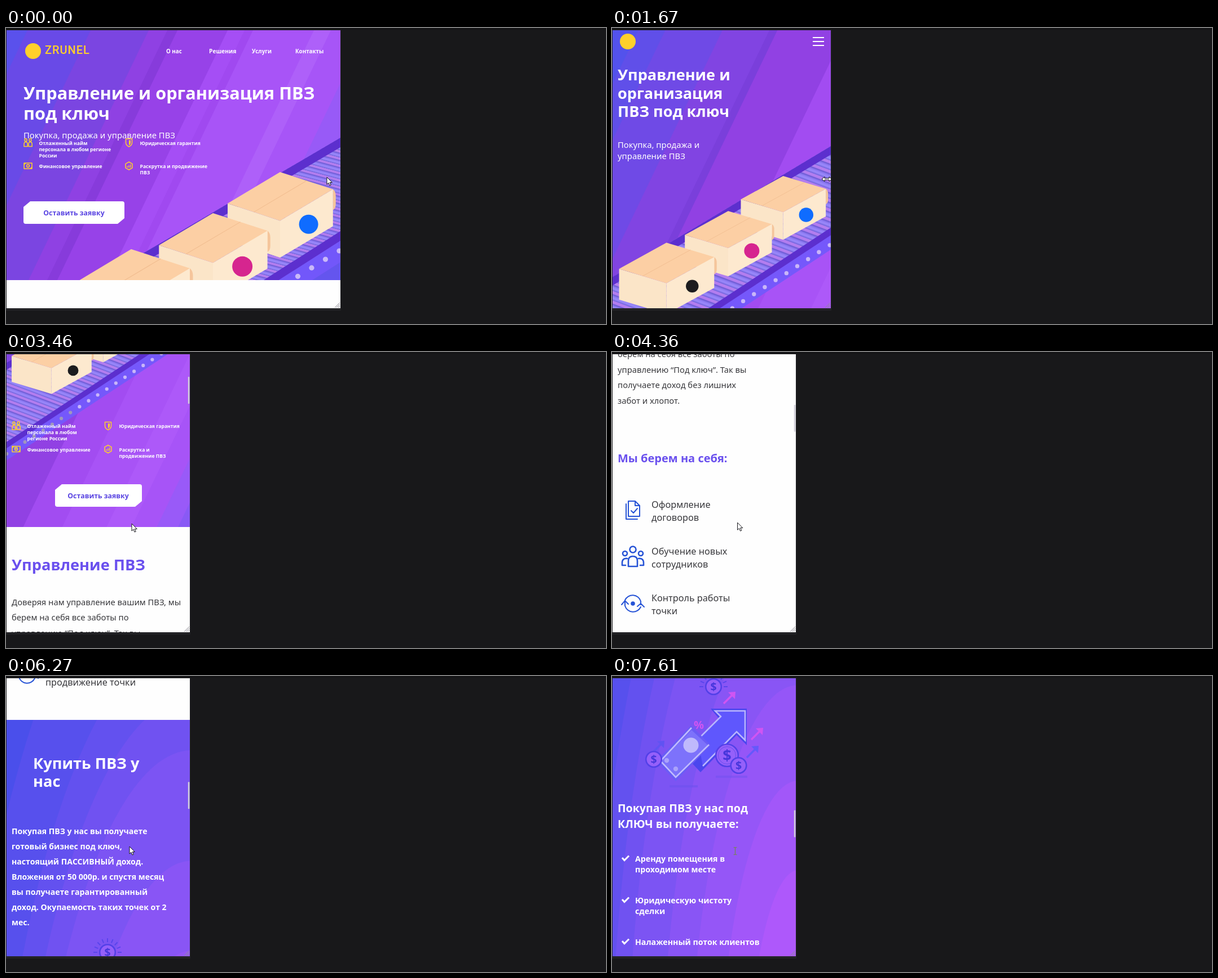
An HTML page for the animation above (8000 ms loop, 1064 by 526 pixels).

```html
<!DOCTYPE html>
<html lang="ru">
<head>
<meta charset="utf-8">
<title>Адаптивная страница</title>
<style>
html, body { margin: 0; width: 100%; height: 100%; overflow: hidden; background: #18181a; }
svg { display: block; width: 1064px; height: 526px; }
text { font-family: "Noto Sans", "Open Sans", sans-serif; white-space: pre; }
</style>
</head>
<body>
<svg id="stage" viewBox="0 0 1064 526" xmlns="http://www.w3.org/2000/svg"></svg>
<script>
const $ = id => document.getElementById(id);
const WHITE = '#fff', YELLOW = '#ffd02b', BLUE = '#2653d6', INK = '#37373b';

// ---------- drawing helpers ----------
const text = (x, y, s, size, fill, weight = 400, extra = '') =>
  `<text x="${x}" y="${y}" font-size="${size}" fill="${fill}" font-weight="${weight}" ${extra}>${s}</text>`;
const lines = (x, y, step, rows, size, fill, weight) =>
  rows.map((s, i) => text(x, y + i * step, s, size, fill, weight)).join('');
const rect = (x, y, w, h, fill, extra = '') =>
  `<rect x="${x}" y="${y}" width="${w}" height="${h}" fill="${fill}" ${extra}/>`;
const dot = (x, y, r, fill, extra = '') => `<circle cx="${x}" cy="${y}" r="${r}" fill="${fill}" ${extra}/>`;
const poly = (pts, fill, extra = '') => `<polygon points="${pts}" fill="${fill}" ${extra}/>`;
const path = (d, fill, extra = '') => `<path d="${d}" fill="${fill}" ${extra}/>`;
const line = (d, color, w, extra = '') => path(d, 'none', `stroke="${color}" stroke-width="${w}" ${extra}`);
const at = (x, y, body) => `<g transform="translate(${x} ${y})">${body}</g>`;

// Slanted bands, each running from its top intercept to the far right.
const bands = list => list.map(([x, fill]) =>
  poly(`${x + 168},-350 3000,-350 3000,950 ${x - 456},950`, fill)).join('');

// Strip between two sloping lines y = a + (x0 - x) * k.
function strip(x0, a, ka, b, kb, fill) {
  const y = (v, k, x) => v + (x0 - x) * k;
  return poly(`-60,${y(a, ka, -60)} 900,${y(a, ka, 900)} 900,${y(b, kb, 900)} -60,${y(b, kb, -60)}`, fill);
}

function box(x, y, sx, sy, mark, r) {
  return `<g transform="translate(${x} ${y}) scale(${sx} ${sy})">` +
    path('M113,34 q6,4 6,13 v16 q0,9 -6,12 z', '#f5c59b') +
    poly('-112,62 0,96 0,169 -112,135', '#fbe5c8') +
    poly('0,96 113,34 113,107 0,169', '#fde9cf') +
    poly('0,0 113,34 0,96 -112,62', '#fccfa4') +
    line('M-56,79 L57,17', '#f1bd90', 1.2) + '</g>' +
    dot(x + 61 * sx, y + 103 * sy, r, mark);
}

const marks = ['#0f6cff', '#d6258f', '#1c1c1e'];

function wideArt() {
  let s = rect(0, 0, 700, 460, '#5a51ec') + bands([
    [40, '#694ae7'], [152, '#7b45e1'], [255, '#8f41e3'], [288, '#873bdb'], [306, '#9742e8'],
    [395, '#a54ef5'], [425, '#a049f0'], [440, '#a854f7'], [548, '#ae60f9'], [578, '#a755f7'],
    [640, '#985af7'], [690, '#8358f6']]);
  s += strip(593, 195, .587, 362, .64, 'url(#slatsFine)');
  s += strip(593, 195, .587, 212, .587, '#5c2fce');
  s += strip(593, 378, .64, 416, .64, '#7257fa') + strip(593, 361, .64, 378, .64, '#5c2fce');
  s += strip(593, 416, .64, 620, .64, '#6455ee');
  for (let i = 0; i < 5; i++) s += dot(591 - i * 24.5, 396 + i * 15.1, 4.6, '#c9b8f8');
  return s + box(486, 256, .83, .9, marks[0], 17) + box(367, 329, .855, .92, marks[1], 18) +
    box(222, 393, .92, 1, marks[2], 15);
}

function narrowArt() {
  let s = rect(-100, -350, 1500, 1400, '#5352ec') + bands([
    [-25, '#604fe9'], [39, '#6f4ae6'], [174, '#8144e2'], [285, '#7a3fdb'], [304, '#9141e3'],
    [465, '#a24cf1'], [575, '#a853f6'], [700, '#ad59f9'], [770, '#a754f7'],
    [841, '#995af8'], [901, '#895af5']]);
  s += strip(489, 104, .601, 302, .66, 'url(#slats)');
  s += strip(489, 104, .601, 124, .601, '#5c2fce');
  s += strip(489, 316, .66, 351, .66, '#7558fb') + strip(489, 299, .66, 317, .66, '#5c2fce');
  for (let i = -3; i < 19; i++) {
    const x = 468 - i * 25.6;
    s += dot(x, 352 + i * 16.6, 4.9, x < 195 ? '#a096bd' : '#c9b6f8');
  }
  return s + box(409, 155, .893, .893, marks[0], 17) + box(279, 238, .915, .915, marks[1], 18) +
    box(133, 313, 1, 1, marks[2], 15);
}

// ---------- hero parts ----------
const stroke = (d, w = 1.5) => line(d, YELLOW, w, 'stroke-linejoin="round"');
const featIcons = {
  people: stroke('M-6,-4.5 a2,2.4 0 1 1 4,0 a2,2.4 0 1 1 -4,0 M2,-4.5 a2,2.4 0 1 1 4,0 a2,2.4 0 1 1 -4,0 ' +
    'M-7,7 v-4 q0,-4 3.2,-4 q3,0 3,4 v4 z M1,7 v-4 q0,-4 3.2,-4 q3,0 3,4 v4 z'),
  shield: stroke('M-5.5,-6.5 h11 v7 q0,4 -5.5,7 q-5.5,-3 -5.5,-7 z') + path('M0,-4 h3 v5 q0,2 -3,4 z', YELLOW),
  cash: stroke('M-7,-5 h14 v10 h-14 z') + stroke('M-2.4,0 a2.4,2.4 0 1 1 4.8,0 a2.4,2.4 0 1 1 -4.8,0') +
    path('M-7,-5 h4 l-4,4 z M7,5 h-4 l4,-4 z', YELLOW),
  chart: stroke('M0,-7 L6,-3.6 V3.6 L0,7 L-6,3.6 V-3.6 Z') + stroke('M-2.8,3 V0.5 M0,3 V-1 M2.8,3 V-2.5', 1.4)
};
const feature = (x, y, icon, rows) =>
  at(x, y, featIcons[icon] + lines(19.5, 4, 11, rows, 8.6, WHITE, 600));

function features(x1, x2, y, first, last) {
  return feature(x1, y, 'people', first) + feature(x2, y, 'shield', ['Юридическая гарантия']) +
    feature(x1, y + 41.5, 'cash', ['Финансовое управление']) + feature(x2, y + 41.5, 'chart', last);
}

const button = (x, y, w, dx) => at(x, y,
  path(`M12,0 H${w - 4} q4,0 4,4 V30 L${w - 12},40 H4 q-4,0 -4,-4 V10 Z`, WHITE) +
  text(dx, 25, 'Оставить заявку', 12.3, '#5a45e2', 700, 'text-anchor="middle"'));

const burger = id => `<g id="${id}">` + [0, 7, 14].map(y => rect(0, y, 20, 2, WHITE)).join('') + '</g>';

const heroWide = () =>
  dot(48, 41, 14, YELLOW) +
  `<text x="69" y="46" font-size="20" font-weight="500" fill="${YELLOW}" letter-spacing="1" style="font-family:Roboto,sans-serif">ZRUNEL</text>` +
  text(284, 45, 'О нас', 9.8, WHITE, 600) + text(360, 45, 'Решения', 10.2, WHITE, 700) +
  text(436, 45, 'Услуги', 9.8, WHITE, 600) + text(513, 45, 'Контакты', 9.8, WHITE, 600) +
  lines(31, 127, 36, ['Управление и организация ПВЗ', 'под ключ'], 30.7, WHITE, 700) +
  text(31, 196, 'Покупка, продажа и управление ПВЗ', 14.8, WHITE) +
  features(39, 218, 203.5, ['Отлаженный найм', 'персонала в любом регионе', 'России'], ['Раскрутка и продвижение', 'ПВЗ']) +
  button(31, 308, 179, 89.5);

const heroMid = () =>
  dot(92, 32, 19, YELLOW) + burger('burgerMid') +
  lines(66, 104, 32.5, ['Управление и', 'организация ПВЗ', 'под ключ'], 27.1, WHITE, 700) +
  lines(66, 223, 19.5, ['Покупка, продажа и управление', 'ПВЗ'], 14.8, WHITE);

const heroSmall = () =>
  dot(28, 24, 14, YELLOW) + burger('burgerSmall') +
  lines(10, 93, 32.5, ['Управление и', 'организация', 'ПВЗ под ключ'], 27.1, WHITE, 700) +
  lines(10, 213, 19.5, ['Покупка, продажа и', 'управление ПВЗ'], 14.8, WHITE) +
  features(18, 181, 507, ['Отлаженный найм', 'персонала в любом', 'регионе России'], ['Раскрутка и', 'продвижение ПВЗ']) +
  button(87, 611, 154, 76.5);

// ---------- page below the hero ----------
const bl = (d, w = 2) => line(d, BLUE, w, 'stroke-linecap="round" stroke-linejoin="round"');
const itemIcons = {
  pin: path('M0,19 L-8,8 H-13 V-8 H13 V8 H8 Z', BLUE) + dot(0, 0, 5, WHITE),
  growth: path('M-16,-4 l5,2 v12 l-5,5 z M-7,-9 l5,-1 v12 l-5,4 z M2,-17 h6 v19 l-6,4 z', BLUE) +
    line('M-14,16 L-4,7 L3,14 L14,3', BLUE, 4) + path('M8,-1 h10 v10 z', BLUE),
  docs: bl('M-8,-16 H4 L12,-8 V11 H-8 Z M4,-16 V-8 H12 M-12,-11 V16 H8 M-3,1 L1,5 L8,-3'),
  team: bl('M-5.5,-13 a5.5,5.5 0 1 1 11,0 a5.5,5.5 0 1 1 -11,0 M-18,-6 a4,4 0 1 1 8,0 a4,4 0 1 1 -8,0 ' +
    'M10,-6 a4,4 0 1 1 8,0 a4,4 0 1 1 -8,0 M-8,17 V7 q0,-8 8,-8 q8,0 8,8 V17 Z ' +
    'M-10,3 q-9,-1 -9,8 v4 h6 M10,3 q9,-1 9,8 v4 h-6', 2.6),
  cycle: bl('M-14,-6 A15,15 0 0 1 14,-4 L14,2 M14,6 A15,15 0 0 1 -14,4 L-14,-2 M-20,2 L-14,-5 L-8,1 M8,5 L14,0 L20,6') +
    dot(0, 0, 3.8, BLUE)
};
const item = (y, icon, rows) =>
  at(37, y + 10, itemIcons[icon]) + lines(70, y + 5.5, 23, rows, 16.2, INK);

const services = () =>
  text(10, 764, 'Управление ПВЗ', 27.2, '#6a50ee', 700) +
  lines(10, 826, 27.4, ['Доверяя нам управление вашим ПВЗ, мы', 'берем на себя все заботы по',
    'управлению “Под ключ”. Так вы', 'получаете доход без лишних', 'забот и хлопот.'], 14.7, INK) +
  text(10, 1040, 'Мы берем на себя:', 20, '#6a50ee', 700) +
  item(1115, 'docs', ['Оформление', 'договоров']) +
  item(1198, 'team', ['Обучение новых', 'сотрудников']) +
  item(1281, 'cycle', ['Контроль работы', 'точки']) +
  item(1364, 'pin', ['Закупка мебели', 'или оборудования']) +
  item(1447, 'growth', ['Финансовое', 'управление и', 'планирование']) +
  item(1553, 'docs', ['Решение вопросов с', 'арендаторами']) +
  item(1637, 'team', ['Найм и управление', 'персоналом']) +
  item(1720, 'cycle', ['Раскрутка и', 'продвижение точки']);

function offerBack() {
  const a = [74, 79, 235], b = [174, 88, 251];
  const radii = [1560, 1340, 1230, 1136, 940, 780, 610, 451];
  return '<g clip-path="url(#offer)">' + rect(0, 1810, 700, 1000, `rgb(${a})`) + radii.map((r, i) => {
    const c = a.map((v, j) => Math.round(v + (b[j] - v) * (i + 1) / 8));
    return `<ellipse cx="330" cy="3000" rx="${r * .31 - 48}" ry="${r}" fill="rgb(${c})"/>`;
  }).join('') + '</g>';
}

const coin = (x, y, r) => dot(x, y, r - 1.2, '#9560fa', 'stroke="#5340e8" stroke-width="2.6"') +
  text(x, y + r * .46, '$', r * 1.3, '#4636dc', 700, 'text-anchor="middle"');
const arrow = (x, y, color) => at(x, y,
  line('M0,0 L17,-17', color, 3.6) + path('M8,-20 L21,-21 L20,-8 Z', color));

function money() {
  let rays = '';
  for (let i = 0; i < 9; i++) {
    const a = Math.PI * (1 + i / 8), c = Math.cos(a), s = Math.sin(a);
    rays += `M${180 + c * 18},${19 + s * 18} L${180 + c * 25},${19 + s * 25} `;
  }
  return rect(184, 177, 56, 4, '#7350f0', 'opacity=".5"') + rect(102, 194, 50, 4, '#6a50ee', 'opacity=".5"') +
    line(rays, '#5a44ec', 2) + coin(180, 19, 15) +
    arrow(198, 49, '#cf55f2') + arrow(247, 113, '#cf55f2') + arrow(239, 145, '#6558fb') + arrow(72, 136, '#6053f2') +
    poly('175,58 239,58 239,123 221,105 157,171 142,155 189,75', '#4b46ee') +
    poly('183,62 236,62 236,114 221,99 161,160 152,111 192,73', '#5f57fd') +
    line('M161,160 L221,99 L236,114 V62 H183 L193,72 L155,110', '#b9b6fd', 2.6) +
    poly('140,88 175,123 113,187 79,151', '#6a5cf5') +
    poly('141,96 170,123 113,180 87,151', '#7d72fb') +
    line('M141,92 L86,151 L113,180 L172,122', '#c0bcfd', 2.6) +
    dot(140, 123, 13.5, '#bfb9fc') + dot(97, 150, 4.2, '#aaa2fb') + dot(113, 165, 4.2, '#aaa2fb') +
    text(145, 94, '%', 20, '#cf55f2', 600) +
    coin(74, 148, 15) + coin(204, 141, 21) + dot(204, 141, 15.5, 'none', 'stroke="#6b4df0" stroke-width="1"') +
    coin(224.5, 159, 15);
}

const tick = y => line(`M18,${y} l4,4.5 l8,-8`, WHITE, 3);

const offer = () => offerBack() +
  lines(48, 1897, 32, ['Купить ПВЗ у', 'нас'], 27.2, WHITE, 700) +
  lines(10, 2013, 27, ['Покупая ПВЗ у нас вы получаете', 'готовый бизнес под ключ,', 'настоящий ПАССИВНЫЙ доход.',
    'Вложения от 50 000р. и спустя месяц', 'вы получаете гарантированный', 'доход. Окупаемость таких точек от 2', 'мес.'],
    14.1, WHITE, 600) +
  at(0, 2204, money() +
    lines(10, 242, 28, ['Покупая ПВЗ у нас под', 'КЛЮЧ вы получаете:'], 19.6, WHITE, 700) +
    tick(323) + lines(41, 330, 18.5, ['Аренду помещения в', 'проходимом месте'], 14.2, WHITE, 600) +
    tick(397) + lines(41, 404, 18.5, ['Юридическую чистоту', 'сделки'], 14.2, WHITE, 600) +
    tick(471) + text(41, 478, 'Налаженный поток клиентов', 14.2, WHITE, 600));

// ---------- scene ----------
const slats = (id, x, y) =>
  `<linearGradient id="${id}" gradientUnits="userSpaceOnUse" x1="0" y1="0" x2="${x}" y2="${y}" spreadMethod="repeat">` +
  [[0, '#6b5ad2'], [.2, '#8f7cf4'], [.4, '#9a8afb'], [.62, '#7565de'], [.66, '#b57fee'], [.92, '#b07cf0'], [1, '#6b5ad2']]
    .map(([o, c]) => `<stop offset="${o}" stop-color="${c}"/>`).join('') + '</linearGradient>';
const clip = (id, y, w, h) =>
  `<clipPath id="${id}"><rect id="${id}Rect" x="1" y="${y}" width="${w}" height="${h}"/></clipPath>`;

$('stage').innerHTML = '<defs>' + slats('slats', -7.5, 20) + slats('slatsFine', -3.2, 12) +
  clip('panel', 4, 592, 494) + clip('heroA', 0, 700, 448) + clip('heroM', 0, 700, 687) +
  clip('offer', 1810, 700, 1000) + '</defs>' +
  rect(0, 0, 1064, 526, '#18181a') + rect(0, 0, 1064, 3, '#131315') +
  `<rect id="foot" x="0" y="3" height="499" fill="#232326"/>` +
  `<g clip-path="url(#panel)">` + rect(0, 0, 700, 526, '#fefefe') +
  `<g id="wide"><g clip-path="url(#heroA)">${wideArt()}</g>${heroWide()}</g>` +
  `<g id="page"><g clip-path="url(#heroM)"><g id="art">${narrowArt()}</g></g>` +
  `<g id="mid">${heroMid()}</g><g id="small">${heroSmall()}</g>${services()}${offer()}</g>` +
  `<rect id="thumb" width="2.6" height="48" rx="1" fill="#d0ced8"/>` +
  `<g id="grip">${line('M-10,-1 L-1,-10 M-7,-1 L-1,-7 M-4,-1 L-1,-4', '#8d8b94', 1)}</g>` +
  `<g id="resize">${path('M-9,0 l5,-4 v2.6 h8 v-2.6 l5,4 l-5,4 v-2.6 h-8 v2.6 z', WHITE, 'stroke="#111" stroke-width="1"')}</g></g>` +
  `<g id="pointer">${path('M0,0 V13 L3,10.2 L5,15 L7.2,14 L5.2,9.5 H9.3 Z', WHITE, 'stroke="#15151a" stroke-width="1"')}</g>` +
  `<g id="beam">${line('M-3,-6 h2 l1,1 l1,-1 h2 M0,-5 V6 M-3,7 h2 l1,-1 l1,1 h2', '#75884f', 1.2)}</g>`;

// ---------- motion ----------
const LOOP = 8000;
const runs = [[150, 1070, 7], [1220, 2120, 7], [2270, 3310, 8], [3460, 4360, 7],
  [4510, 5540, 8], [5850, 6270, 4], [6580, 7610, 8]];
const widthKeys = [[200, 593], [917, 489], [1070, 470], [2120, 326]];
const scrollKeys = [[2570, 0], [3460, 376], [5393, 1382], [5540, 1440], [5700, 1440], [6270, 1732], [6430, 1732], [7610, 2204]];
const xKeys = [[0, 569], [150, 578], [2270, 312], [2418, 304], [2870, 223], [3460, 223], [5393, 222], [6270, 219]];
const yKeys = [[0, 265], [150, 267], [2270, 284], [2418, 281], [2870, 305], [3460, 305], [5393, 301], [6270, 303]];

// The screen refreshes in steps; find the latest one.
function stepped(t) {
  let last = 0;
  for (const [from, to, n] of runs) {
    const d = (to - from) / (n - 1), i = Math.floor((t + 18 - from) / d);
    if (i >= 0) last = from + Math.min(i, n - 1) * d;
  }
  return last;
}

function value(keys, t) {
  if (t <= keys[0][0]) return keys[0][1];
  for (let i = 1; i < keys.length; i++) {
    const [t0, a] = keys[i - 1], [t1, b] = keys[i];
    if (t <= t1) return a + (b - a) * (t - t0) / (t1 - t0);
  }
  return keys[keys.length - 1][1];
}

const set = (id, k, v) => $(id).setAttribute(k, v);
const move = (id, x, y, extra = '') => set(id, 'transform', `translate(${x} ${y})${extra}`);
const show = (id, on) => set(id, 'display', on ? 'inline' : 'none');

function draw(time) {
  const t = stepped(time), w = Math.round(value(widthKeys, t)), scroll = Math.round(value(scrollKeys, t));
  const wide = w >= 576, small = w <= 425;
  const dragging = t > 250 && t < 2200, beam = t > 6900;
  set('panelRect', 'width', w - 1);
  set('foot', 'width', w + 1);
  show('wide', wide);
  show('page', !wide);
  show('mid', !small);
  show('small', small);
  move('page', 0, -scroll);
  if (small) move('art', -3.2, 146.8, ` scale(${.63 * w / 326})`);
  else move('art', 0, 0);
  move('burgerMid', w - 47, 22);
  move('burgerSmall', w - 32, 16);
  show('thumb', t > 2200);
  move('thumb', w - 3.2, 4 + scroll / 9.4);
  move('grip', w, 498);
  show('resize', dragging);
  move('resize', w - 7, 268.5);
  show('pointer', !dragging && !beam);
  move('pointer', value(xKeys, t), value(yKeys, t));
  show('beam', beam);
  move('beam', 218.5, 310.5);
}

const start = performance.now();
function frame(now) {
  draw(Math.max(0, now - start) % LOOP);
  requestAnimationFrame(frame);
}
draw(0);
requestAnimationFrame(frame);
</script>
</body>
</html>
```
